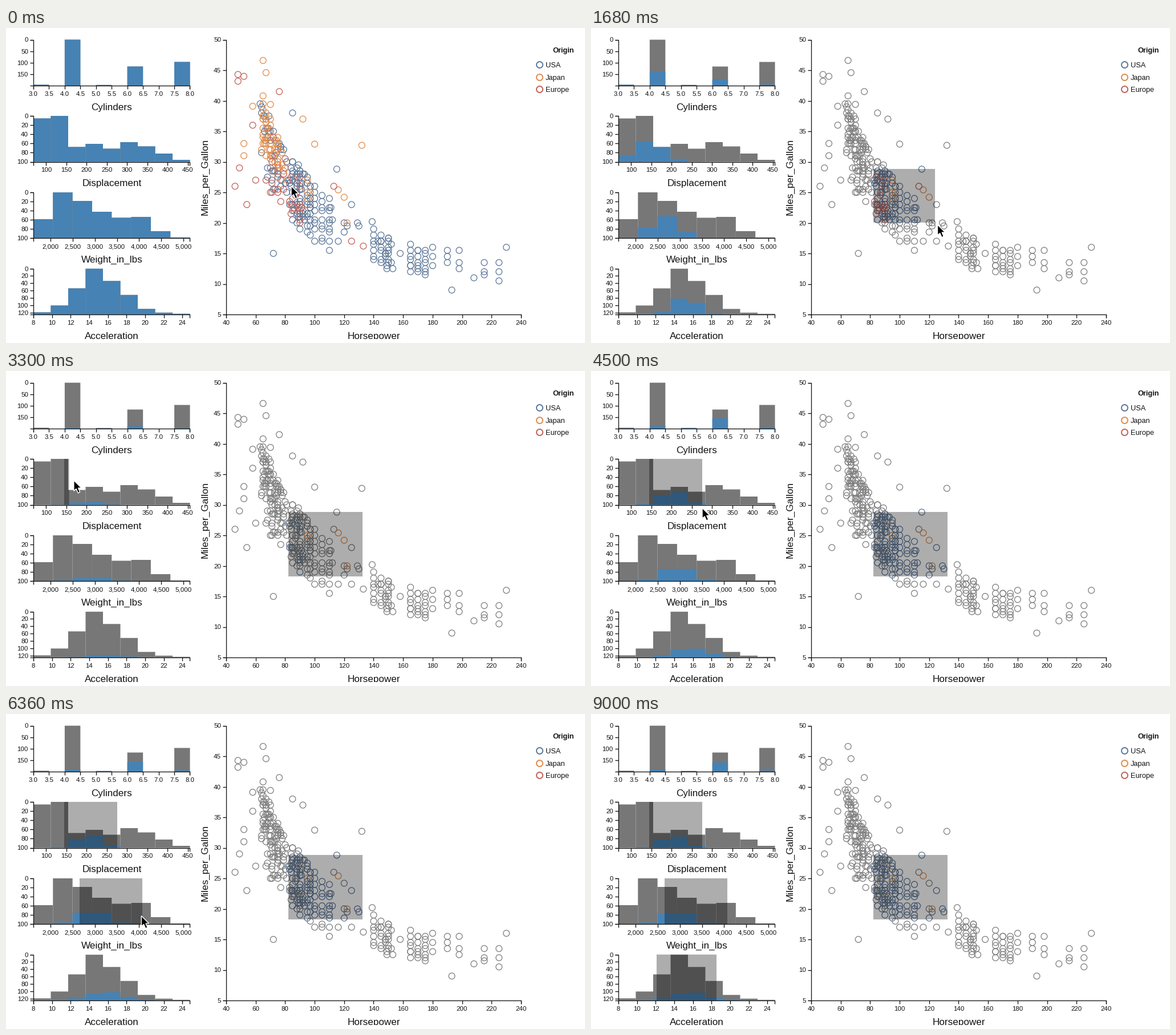
These frames come from a looping animation (1015x552 px, 9.24 s). A matplotlib script:

```python
import numpy as np
import matplotlib.pyplot as plt
from matplotlib.animation import FuncAnimation
from matplotlib.collections import LineCollection
from matplotlib.colors import to_rgba
from matplotlib.patches import Polygon, Rectangle

W, H, DPI = 1015, 552, 100
STEP, FRAMES = 60, 154
PX = 72 / DPI
INK, GRAY, BLUE = "#111111", "#777777", "#4682b4"
COLORS = {"USA": "#5f799b", "Japan": "#e08d4c", "Europe": "#c2635a"}
LEFT, RIGHT = 48, 322.5

plt.rcParams["font.family"] = "Liberation Sans"
fig = plt.figure(figsize=(W / DPI, H / DPI), dpi=DPI, facecolor="white")
ax = fig.add_axes([0, 0, 1, 1])
ax.set_xlim(0, W)
ax.set_ylim(H, 0)
ax.axis("off")
segments = []


def label(x, y, text, size, ha="center", va="baseline", **style):
    ax.text(x, y, text, fontsize=size * PX, ha=ha, va=va, color=INK, **style)


def x_axis(y, x0, x1, ticks):
    segments.append([(x0, y + 6), (x0, y), (x1, y), (x1, y + 6)])
    for x, text in ticks:
        segments.append([(x, y), (x, y + 6)])
        label(x, y + 18, text, 11.5)


def y_axis(x, y0, y1, ticks):
    segments.append([(x - 6, y0), (x, y0), (x, y1), (x - 6, y1)])
    for y, text in ticks:
        segments.append([(x - 6, y), (x, y)])
        label(x - 9, y + 4, text, 11.5, "right")


def ticks(first, gap, values, fmt="{:,}"):
    return [(first + gap * i, fmt.format(v)) for i, v in enumerate(values)]


def ease_out(u):
    return 1 - (1 - np.clip(u, 0, 1)) ** 1.7


def smooth(u):
    u = np.clip(u, 0, 1)
    return u * u * (3 - 2 * u)


class Drag:
    """Pointer drag that opens a brush; the brush trails by one step."""

    def __init__(self, start, end, origin, goal, top=None, bottom=None):
        self.start, self.end = start, end
        self.origin, self.goal = np.array(origin), np.array(goal)
        self.top, self.bottom = top or origin[1], bottom
        self.patch = Rectangle((origin[0], self.top), 0, 0, fc="black",
                               alpha=0.32, lw=0, zorder=6, snap=False)
        ax.add_patch(self.patch)

    def progress(self, t):
        return ease_out((t - self.start) / (self.end - self.start))

    def corner(self, t):
        return self.origin + (self.goal - self.origin) * self.progress(t)

    def update(self, t):
        self.amount = self.progress(t - STEP)
        self.active = self.amount > 0
        self.right, y = self.corner(t - STEP)
        self.low = self.bottom or y
        self.patch.set_width(self.right - self.origin[0])
        self.patch.set_height(self.low - self.top)
        self.patch.set_visible(self.active)

    def holds(self, x):
        return (x >= self.origin[0]) & (x <= self.right)


area = Drag(720, 2107, (495, 247), (625, 360))
sliders = [
    Drag(3180, 4260, (102, 181), (195, 240), 154, 234.5),
    Drag(5040, 6040, (129, 339), (239, 352), 288, 368),
    Drag(7420, 8040, (115, 473), (220, 486), 421.5, 501.8),
]
leave = Drag(8580, 9240, (300, 556), (300, 556))
PAUSE = 240


def cursor_at(t):
    place, since = np.array([500, 277]), -PAUSE
    for drag in [area, *sliders, leave]:
        if t < drag.start:
            moving = since + PAUSE
            u = smooth((t - moving) / (drag.start - moving))
            return place + (drag.origin - place) * u
        if t < drag.end:
            return drag.corner(t)
        place, since = drag.goal, drag.end
    return place


class Histogram:
    """Full bars, plus bells (peak, centre, width) for the selected share."""

    def __init__(self, title, top, base, full, broad, narrow, xticks, yticks):
        self.base, self.full = base, np.array(full)
        bins = np.arange(len(full))
        self.broad, self.narrow = [
            np.minimum(peak * np.exp(-((bins - mid) / width) ** 2), full)
            for peak, mid, width in (broad, narrow)]
        edges = np.linspace(LEFT, RIGHT, len(full) + 1)
        self.bars = []
        for x0, x1, h in zip(edges, edges[1:], full):
            for color in (GRAY, BLUE):
                bar = Rectangle((x0, base - h), x1 - x0, h, fc=color, lw=0,
                                snap=False)
                ax.add_patch(bar)
            self.bars.append(bar)
        x_axis(base, LEFT, RIGHT, xticks)
        y_axis(LEFT, top, base, yticks)
        label(185.5, base + 43, title, 17.1)

    def update(self):
        first, second, third = sliders
        if not area.active:
            heights = self.full
        elif not first.active:
            heights = np.minimum(1.2 * area.amount * self.broad, self.full)
        else:
            share = first.amount ** 0.6
            if second.active:
                share *= 0.94 * second.amount ** 0.4
            if third.active:
                share *= 0.95 * third.amount
            heights = share * self.narrow
        for bar, h in zip(self.bars, heights):
            bar.set_y(self.base - h)
            bar.set_height(h)


histograms = [
    Histogram("Cylinders", 20.5, 101,
              [1.6, 0, 80.5, 0, 1.2, 0, 33.5, 0, 0, 41.5],
              (25, 2, 4.4), (20, 5.2, 2.6),
              ticks(48, 27.45, np.arange(3, 8.1, 0.5), "{:.1f}"),
              ticks(20.5, 20.2, range(0, 151, 50))),
    Histogram("Displacement", 154, 234.5,
              [76, 80.5, 26, 31.5, 23, 34.5, 27, 14.5, 3.5],
              (38, 1.3, 1.2), (25, 2.65, 1),
              ticks(70.5, 35.5, range(100, 451, 50)),
              ticks(154, 16.1, range(0, 101, 20))),
    Histogram("Weight_in_lbs", 288, 368,
              [33, 80, 65, 46, 35.5, 37, 12, 1],
              (39, 1.85, 1), (27, 2.5, 1),
              ticks(78, 38.85, range(2000, 5001, 500)),
              ticks(288, 16, range(0, 101, 20))),
    Histogram("Acceleration", 421.5, 501.8,
              [3.5, 15.5, 45.5, 80, 58.5, 34, 9.5, 3, 1],
              (31, 3.35, 1), (16, 3.65, 1.4),
              ticks(48, 32.65, range(8, 25, 2)),
              ticks(421.5, 12.85, range(0, 121, 20))),
]

x_axis(502, 386, 903, ticks(386, 51.7, range(40, 241, 20)))
y_axis(386, 20.5, 502, ticks(20.5, 53.5, range(50, 4, -5)))
label(644.5, 545, "Horsepower", 17.1)
label(349.5, 261, "Miles_per_Gallon", 17.1, va="center", rotation=90)
ax.add_collection(LineCollection(segments, colors=INK, lw=1.3 * PX, zorder=3))

label(977.5, 42.5, "Origin", 12.7, weight="bold")
for i, (name, color) in enumerate(COLORS.items()):
    y = 64 + 21.7 * i
    ax.plot(935, y, "o", ms=11 * PX, mfc="none", mec=color, mew=2 * PX)
    label(946, y + 5, name, 12.7, "left")

# The few cars far from the common curve: (horsepower, miles per gallon)
OUTLIERS = {
    "USA": [(230, 16), (193, 9), (208, 11), (115, 28.8), (125, 23),
            (139, 20.2), (85, 38), (64, 39), (72, 15)],
    "Japan": [(65, 46.6), (67, 44.6), (65, 40.8), (58, 39.1), (70, 39.4),
              (52, 33), (52, 31), (92, 37), (100, 32.9), (132, 32.7),
              (120, 24.2), (122, 20), (116, 25.4)],
    "Europe": [(48, 44.3), (48, 43.2), (52, 44), (76, 41.5), (46, 26),
               (49, 29), (54, 23), (58, 36), (60, 27), (113, 26),
               (125, 17), (133, 16.2)],
}


def make_cars(rng):
    """Mileage falls as 1 / horsepower; each family spreads around that."""
    families = [
        ("USA", [85, 88, 90, 95, 97, 100, 105, 110], 9, 0.78, 1.2),
        ("USA", [140, 145, 150, 165, 170, 175], 7, 0.84, 1.2),
        ("USA", [180, 190, 198, 215, 225], 3, 0.98, 1.32),
        ("USA", rng.integers(63, 94, 55), 1, 0.85, 1.2),
        ("USA", rng.integers(110, 160, 20), 1, 0.8, 1.15),
        ("Japan", [65, 67, 70, 75], 8, 0.97, 1.2),
        ("Japan", [95, 97], 4, 0.98, 1.2),
        ("Japan", rng.integers(64, 80, 20), 1, 0.95, 1.15),
        ("Europe", [71, 75, 90], 5, 0.82, 1.05),
        ("Europe", rng.integers(65, 92, 28), 1, 0.8, 1.15),
    ]
    cars = [(*car, name) for name in OUTLIERS for car in OUTLIERS[name]]
    for name, powers, n, low, high in families:
        for power in powers:
            spread = low + (high - low) * (np.arange(n) + rng.random(n)) / n
            mileage = np.round(2 * (2050 / power + 1.5) * spread) / 2
            cars += [(power, m, name) for m in mileage]
    return [cars[i] for i in rng.permutation(len(cars))]


rng = np.random.default_rng(12)
power, mileage, owner = map(np.array, zip(*make_cars(rng)))
count = len(power)
car_x, car_y = 386 + (power - 40) * 2.585, 502 - (mileage - 5) * 10.7

# Where each car falls along the brushed small charts
car_values = [
    0.9 * power + 40 * (owner == "USA") + rng.normal(0, 10, count),
    rng.uniform(122, 228, count),
    rng.normal(166, 24, count),
]

tints = np.array([to_rgba(COLORS[name]) for name in owner])
grays = np.array([to_rgba("#808080")] * count)
ring = dict(s=(10.8 * PX) ** 2, facecolors="none", linewidths=1.3 * PX)
muted = ax.scatter(car_x, car_y, zorder=4, **ring)
vivid = ax.scatter(car_x, car_y, zorder=5, **ring)

# The page edge cuts the lowest titles
ax.add_patch(Rectangle((0, 545), W, 7, fc="white", lw=0, zorder=7))
ax.plot([0, W], [551.5, 551.5], color="#eeeeee", lw=PX, zorder=8)

ARROW = np.array([(0, 0), (0, 18.5), (4.2, 14.7), (7.4, 22), (10.8, 20.5),
                  (7.7, 13.3), (13.4, 13.3)])
cursor = Polygon(ARROW, fc="black", ec="white", lw=1.4 * PX, zorder=9)
ax.add_patch(cursor)


def draw(frame):
    t = frame * STEP
    for drag in [area, *sliders, leave]:
        drag.update(t)
    for hist in histograms:
        hist.update()

    chosen = np.ones(count, bool)
    if area.active:
        chosen = area.holds(car_x) & (car_y >= area.top) & (car_y <= area.low)
    for drag, values in zip(sliders, car_values):
        if drag.active:
            chosen &= drag.holds(values)
    tints[:, 3] = chosen
    grays[:, 3] = ~chosen
    vivid.set_edgecolors(tints.copy())
    muted.set_edgecolors(grays.copy())

    cursor.set_xy(ARROW + cursor_at(t))
    cursor.set_visible(t < leave.start)
    return []


anim = FuncAnimation(fig, draw, frames=FRAMES, interval=STEP, repeat=True,
                     repeat_delay=0, blit=False)
plt.show()
```
